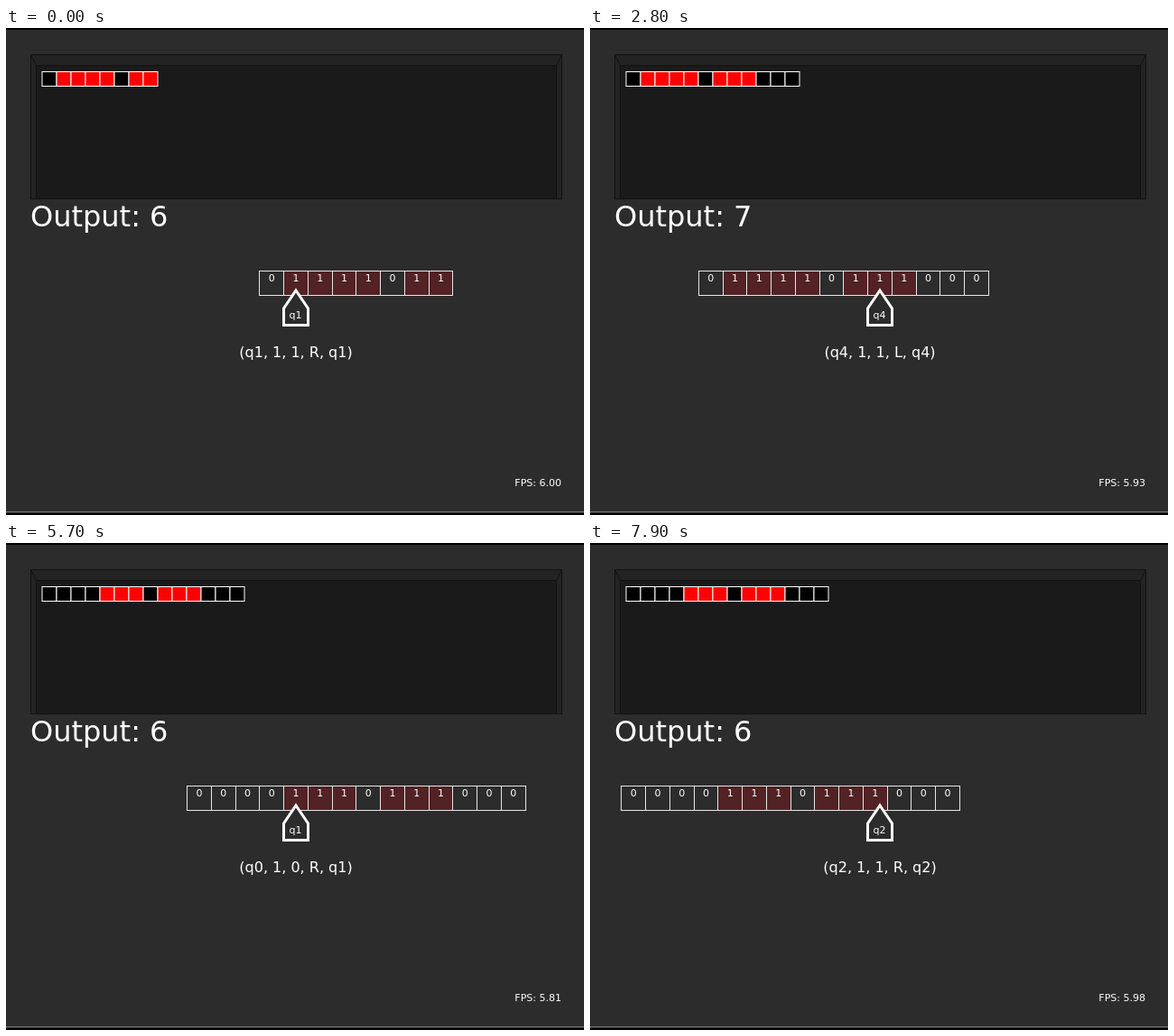
An HTML page with a canvas for the animation above (8 s loop, 640x540 px).

```html
<!DOCTYPE html>
<html lang="en">
<head>
<meta charset="utf-8">
<title>Unary adder</title>
<style>
html, body { margin: 0; width: 100%; height: 100%; overflow: hidden; background: #2c2c2c; }
canvas { display: block; }
</style>
</head>
<body>
<canvas id="stage" width="640" height="540"></canvas>
<script>
const ctx = document.getElementById('stage').getContext('2d');
const BG = '#2c2c2c', CELL = 26.75, MINI = 16, CENTER = 321;
const TICK = 100, TICKS = 80;

// Transition rules: state + symbol -> [write, move, next state]
const RULES = {
  q0: { 1: [0, 'R', 'q1'] },
  q1: { 1: [1, 'R', 'q1'], 0: [0, 'R', 'q2'] },
  q2: { 1: [1, 'R', 'q2'], 0: [1, 'L', 'q4'] },
  q4: { 1: [1, 'L', 'q4'], 0: [0, 'L', 'q5'] },
  q5: { 1: [1, 'L', 'q5'], 0: [0, 'R', 'q0'] }
};
// Tick at which each machine step begins
const STARTS = [0, 4, 7, 11, 14, 18, 21, 25, 28, 31, 34, 37,
  41, 44, 47, 51, 54, 58, 61, 65, 68, 71, 74, 78];
const FPS = [[0, 6], [21, 5.95], [35, 5.91], [47, 5.84], [57, 5.81], [71, 5.87], [79, 5.98]];

const steps = simulate();

function simulate() {
  const tape = [0, 1, 1, 1, 1, 0, 1, 1, 0, 0, 0, 0];
  let head = 1, state = 'q1';
  return STARTS.map(start => {
    const symbol = tape[head];
    const [write, move, next] = RULES[state][symbol];
    const step = {
      start, head, next,
      dir: move === 'R' ? 1 : -1,
      rule: `(${state}, ${symbol}, ${write}, ${move}, ${next})`
    };
    tape[head] = write;
    step.tape = tape.slice();
    head += step.dir;
    state = next;
    return step;
  });
}

function stepIndex(tick) {
  let i = 0;
  while (i + 1 < steps.length && STARTS[i + 1] <= tick) i++;
  return i;
}

// The tape gains two blank cells whenever the head nears an end.
function cellsAt(tick) {
  const tape = steps[stepIndex(tick)].tape;
  const length = tick >= 21 ? 12 : tick >= 14 ? 10 : 8;
  const pad = tick >= 46 ? [0, 0] : [];
  return pad.concat(tape.slice(0, length));
}

function headAt(tick) {
  const i = stepIndex(tick), s = steps[i];
  const progress = [0, 0.33 - 0.006 * i][tick - s.start] ?? 1;
  return s.head + s.dir * progress;
}

function fpsAt(tick) {
  let i = 0;
  while (i < FPS.length - 2 && FPS[i + 1][0] <= tick) i++;
  const [t0, a] = FPS[i], [t1, b] = FPS[i + 1];
  return a + (b - a) * (tick - t0) / (t1 - t0);
}

function text(str, x, y, size, align) {
  ctx.font = `${size}px "DejaVu Sans", sans-serif`;
  ctx.textAlign = align;
  ctx.fillStyle = '#fff';
  ctx.fillText(str, x, y);
}

function box(x, y, w, h, fill, stroke) {
  ctx.fillStyle = fill;
  ctx.fillRect(x, y, w, h);
  ctx.lineWidth = 1;
  ctx.strokeStyle = stroke;
  ctx.strokeRect(x, y, w, h);
}

function line(x1, y1, x2, y2) {
  ctx.beginPath();
  ctx.moveTo(x1, y1);
  ctx.lineTo(x2, y2);
  ctx.stroke();
}

function drawPanel() {
  box(27.5, 29.5, 588, 160, '#232323', '#121212');
  box(33.5, 41.5, 576, 148, '#1a1a1a', '#121212');
  line(27.5, 29.5, 33.5, 41.5);
  line(615.5, 29.5, 609.5, 41.5);
}

function drawPointer(state) {
  ctx.beginPath();
  ctx.moveTo(321, 291);
  for (const [x, y] of [[334.5, 311], [334.5, 329.5], [307.5, 329.5], [307.5, 311]]) ctx.lineTo(x, y);
  ctx.closePath();
  ctx.fillStyle = BG;
  ctx.fill();
  ctx.lineWidth = 3;
  ctx.strokeStyle = '#fff';
  ctx.stroke();
  text(state, 320.5, 321.5, 11, 'center');
}

function draw(tick) {
  const step = steps[stepIndex(tick)];
  const cells = cellsAt(tick);
  const offset = tick >= 46 ? 2 : 0;
  const left = CENTER - CELL * (headAt(tick) + offset + 0.5);

  ctx.fillStyle = BG;
  ctx.fillRect(0, 0, 640, 540);
  ctx.fillStyle = '#000';
  ctx.fillRect(0, 0, 640, 2);
  ctx.fillRect(0, 538, 640, 2);
  ctx.fillStyle = '#777';
  ctx.fillRect(0, 536, 640, 1);

  drawPanel();
  // The overview strip follows the tape one tick later.
  cellsAt(Math.max(0, tick - 1)).forEach((bit, i) =>
    box(40 + MINI * i, 48.5, MINI, MINI, bit ? '#f00' : '#000', '#fff'));

  text('Output: ' + cells.reduce((a, b) => a + b), 27, 219.5, 32, 'left');

  cells.forEach((bit, i) => {
    const a = Math.floor(left + CELL * i) + 0.5;
    const b = Math.floor(left + CELL * (i + 1)) + 0.5;
    box(a, 269.5, b - a, 27, bit ? '#522224' : BG, '#e6e6e6');
    text(bit, left + CELL * (i + 0.5), 280.5, 11, 'center');
  });

  drawPointer(step.next);
  text(step.rule, CENTER, 365, 16, 'center');
  text('FPS: ' + fpsAt(tick).toFixed(2), 615, 508, 11, 'right');
}

function frame() {
  draw(Math.floor(performance.now() / TICK) % TICKS);
  requestAnimationFrame(frame);
}
frame();
</script>
</body>
</html>
```
